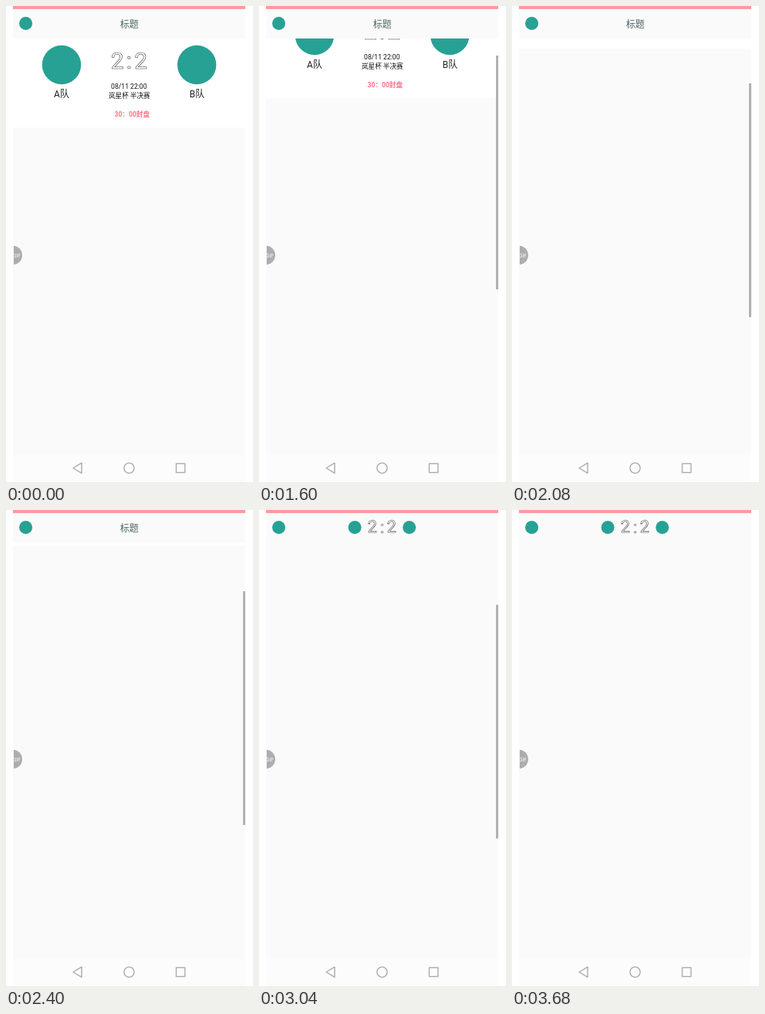
Write an HTML page that moves like this. It is 320 px wide and 615 px high and loops after 4.48 s.

```html
<!DOCTYPE html>
<html lang="zh">
<head>
<meta charset="utf-8">
<title>标题</title>
<style>
html, body { margin: 0; width: 100%; height: 100%; overflow: hidden; background: #fff; }
svg { display: block; width: 320px; height: 615px; }
text { font-family: Roboto, "Noto Sans CJK SC", "Noto Sans CJK", sans-serif; text-anchor: middle; }
.logo { fill: #27a193; }
.info { font-size: 8.6px; fill: #111; }
.team { font-size: 12px; fill: #222; }
.score { fill: #fff; stroke: #333; stroke-width: .55px; }
.nav { fill: none; stroke: #adabab; stroke-width: 1.4px; }

.card, .thumb, .bar, .title, .result { animation: 4480ms step-end infinite; }
.card { animation-name: scroll; }
.thumb { animation-name: slide; }
.bar { animation-name: fade; }
.title { animation-name: leave; }
.result { animation-name: enter; }

@keyframes scroll {
  0% { transform: translateY(0); }
  32.142% { transform: translateY(-12px); }
  35.714% { transform: translateY(-38px); }
  39.285% { transform: translateY(-58px); }
  42.857% { transform: translateY(-81px); }
  46.428% { transform: translateY(-102px); }
  50% { transform: translateY(-107px); }
  53.571% { transform: translateY(-111px); }
  57.142%, 100% { transform: translateY(-116px); }
}
@keyframes slide {
  0% { transform: translateY(42px); }
  32.142% { transform: translateY(49px); }
  35.714% { transform: translateY(64px); }
  39.285% { transform: translateY(75px); }
  42.857% { transform: translateY(88px); }
  46.428% { transform: translateY(100px); }
  50% { transform: translateY(103px); }
  53.571% { transform: translateY(105px); }
  57.142% { transform: translateY(107px); }
  60.714% { transform: translateY(115px); }
  64.285% { transform: translateY(122px); }
  67.857%, 100% { transform: translateY(122.5px); }
}
@keyframes fade {
  0% { opacity: 0; }
  32.142% { opacity: 1; }
  78.571% { opacity: .5; }
  82.142%, 100% { opacity: 0; }
}
@keyframes leave {
  0% { opacity: 1; }
  57.142%, 100% { opacity: 0; }
}
@keyframes enter {
  0% { opacity: 0; }
  57.142%, 100% { opacity: 1; }
}
</style>
</head>
<body>
<svg viewBox="0 0 320 615">
  <defs>
    <clipPath id="view"><rect x="9" y="42" width="301" height="538"/></clipPath>
    <clipPath id="screen"><rect x="10" y="0" width="300" height="615"/></clipPath>
  </defs>

  <rect x="9" width="301" height="615" fill="#fafafa"/>

  <g clip-path="url(#view)">
    <g class="card">
      <rect x="9" y="42" width="301" height="115" fill="#fff"/>
      <circle class="logo" cx="72" cy="76" r="25.2"/>
      <circle class="logo" cx="247.2" cy="76" r="25.2"/>
      <text class="team" x="72" y="118">A队</text>
      <text class="team" x="247.5" y="118">B队</text>
      <g class="score" font-size="30">
        <text x="144.3" y="80.5">2</text>
        <text x="159.5" y="80.5">:</text>
        <text x="174.8" y="80.5">2</text>
      </g>
      <text class="info" x="159.3" y="107.3">08/11 22:00</text>
      <text class="info" x="159.8" y="118.7">岚星杯 半决赛</text>
      <text class="info" x="163.3" y="142.5" style="fill:#fb7189;font-weight:700">30：00封盘</text>
    </g>
    <g class="bar"><rect class="thumb" x="307" width="3" height="302" fill="#b1b1b1"/></g>
  </g>

  <rect x="9" width="301" height="4" fill="#fb9b9f"/>
  <circle class="logo" cx="25.6" cy="22.6" r="8.5"/>
  <text class="title" x="159.7" y="27.8" font-size="12" fill="#4b6464">标题</text>

  <g class="result">
    <circle class="logo" cx="124.1" cy="22.6" r="8.5"/>
    <circle class="logo" cx="194.7" cy="22.6" r="8.5"/>
    <g class="score" font-size="21.5">
      <text x="146.7" y="28.5">2</text>
      <text x="159.5" y="29.5">:</text>
      <text x="171.7" y="28.5">2</text>
    </g>
  </g>

  <g clip-path="url(#screen)">
    <circle cx="8.7" cy="322" r="12.3" fill="#aeacac"/>
    <text x="14" y="324.8" font-size="6.5" fill="#fff">GIF</text>
  </g>

  <rect x="9" y="580" width="301" height="35" fill="#fcfcfc"/>
  <path class="nav" d="M87 597L98 590.4V603.6Z" stroke-linejoin="round"/>
  <circle class="nav" cx="159.5" cy="597" r="6.6"/>
  <rect class="nav" x="220.5" y="591.3" width="11.4" height="11.4"/>
</svg>
</body>
</html>
```
